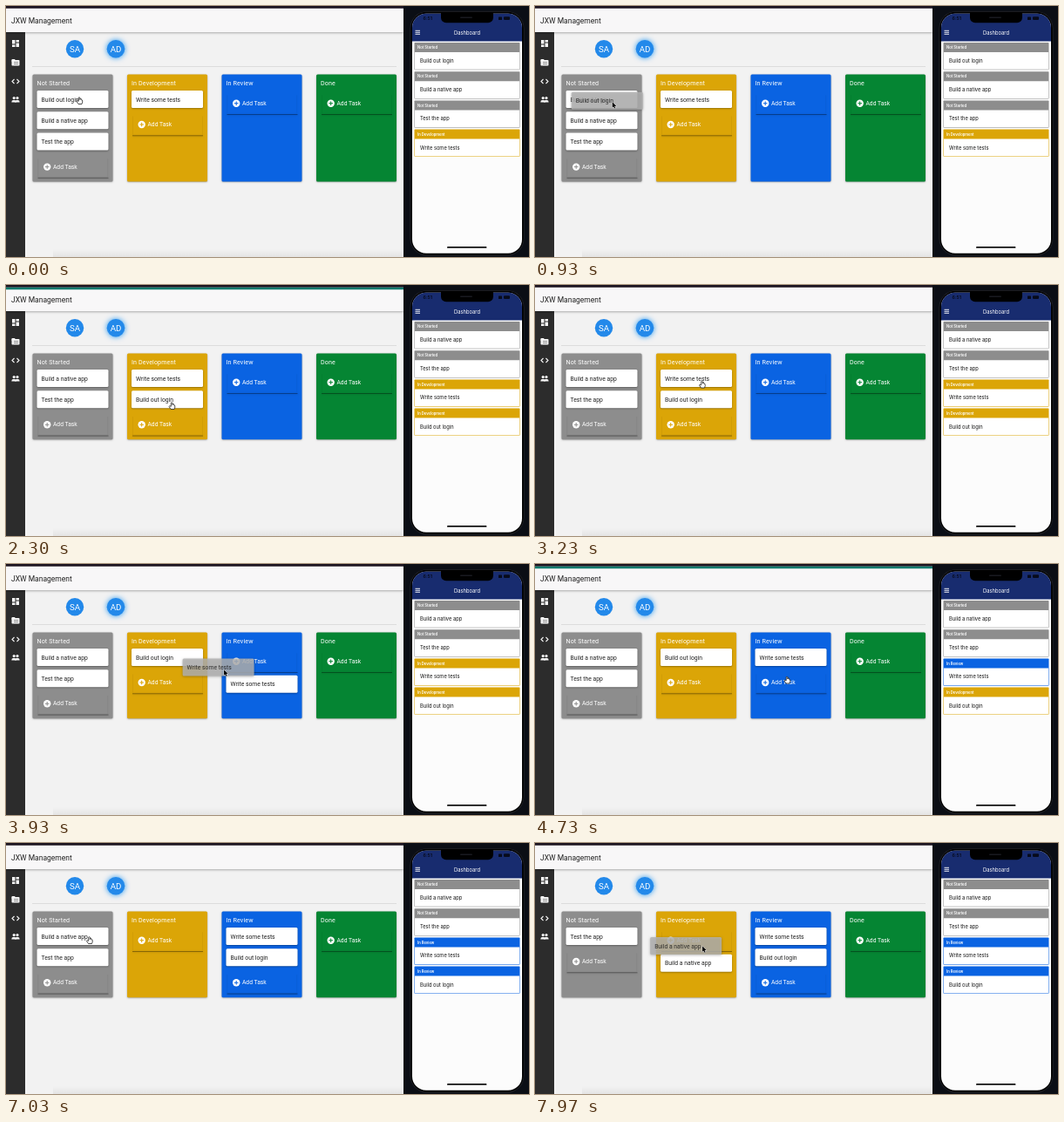
Animation, 600 px wide and 288 px high, one loop 8000 ms. Source, as an HTML page with a canvas:

```html
<!DOCTYPE html>
<html lang="en">
<head>
<meta charset="utf-8">
<title>Task board</title>
<style>
  html, body { margin: 0; width: 100%; height: 100%; overflow: hidden; background: #0b0e15; }
  canvas { display: block; width: 600px; height: 288px; }
</style>
</head>
<body>
<canvas id="stage"></canvas>
<script>
const LOOP = 8000, SETTLE = 200, LOADING = 700;
const canvas = document.getElementById('stage');
const scale = window.devicePixelRatio || 1;
canvas.width = 600 * scale;
canvas.height = 288 * scale;
const ctx = canvas.getContext('2d');
ctx.scale(scale, scale);

const COLUMNS = [
  { title: 'Not Started', x: 30.5, color: '#8d8d8d' },
  { title: 'In Development', x: 139, color: '#dba507' },
  { title: 'In Review', x: 247.5, color: '#0a63e2' },
  { title: 'Done', x: 356, color: '#058533' }
];
const COLUMN_W = 92, CARD_W = 82, CARD_H = 20, FIRST_Y = 97, PITCH = 24.3;

const LOGIN = 'Build out login', NATIVE = 'Build a native app';
const TEST = 'Test the app', WRITE = 'Write some tests';
const START = [[LOGIN, NATIVE, TEST], [WRITE], [], []];
const DRAGS = [
  { task: LOGIN, from: 0, to: 1, grab: 870, drop: 1950 },
  { task: WRITE, from: 1, to: 2, grab: 3450, drop: 4400 },
  { task: LOGIN, from: 1, to: 2, grab: 5700, drop: 6300 },
  { task: NATIVE, from: 0, to: 1, grab: 7400, drop: 9000 }
];

// Pointer tip: time, x, y
const PATH = [
  [0, 84, 104.5], [500, 84, 104.5], [830, 82.5, 108.5], [870, 82.5, 108.5],
  [1600, 158, 130], [1950, 190, 136], [2200, 190, 136], [2900, 191.5, 110],
  [3450, 191.5, 110], [4250, 289, 129], [5000, 289, 129], [5550, 216, 106],
  [5700, 216, 106], [5800, 218, 106], [6250, 312, 120], [6400, 312, 120],
  [6950, 95.5, 107.5], [7400, 95.5, 107.5], [7970, 192, 118.5], [8000, 196, 119]
];

const isDragging = (drag, t) => t >= drag.grab && t < drag.drop;

function pointerAt(t) {
  const i = Math.max(1, PATH.findIndex(key => key[0] >= t));
  const [t0, x0, y0] = PATH[i - 1], [t1, x1, y1] = PATH[i];
  let p = (t - t0) / (t1 - t0);
  if (!DRAGS.some(d => isDragging(d, t))) p = p * p * (3 - 2 * p);
  return { x: x0 + (x1 - x0) * p, y: y0 + (y1 - y0) * p };
}

function boardAt(t, pointer) {
  const lists = START.map(list => [...list]);
  const status = {};
  START.forEach((list, i) => list.forEach(task => status[task] = i));
  let pending = null;
  for (const { task, from, to, grab, drop } of DRAGS) {
    const settled = t >= drop + SETTLE;
    const hovering = t >= grab && (t >= drop || pointer.x >= COLUMNS[to].x);
    if (settled || hovering) lists[from] = lists[from].filter(name => name !== task);
    if (settled) {
      lists[to].push(task);
      status[task] = to;
    } else if (hovering) pending = { task, to };
  }
  return { lists, status, pending };
}

function box(x, y, w, h, fill, radius = 0) {
  ctx.fillStyle = fill;
  ctx.beginPath();
  ctx.roundRect(x, y, w, h, radius);
  ctx.fill();
}

function disc(x, y, r, fill) {
  ctx.fillStyle = fill;
  ctx.beginPath();
  ctx.arc(x, y, r, 0, 7);
  ctx.fill();
}

function text(str, x, y, size, color, { font = 'Roboto', weight = 400, align = 'left', spacing = 0 } = {}) {
  ctx.font = `${weight} ${size}px ${font}, sans-serif`;
  ctx.letterSpacing = spacing + 'px';
  ctx.textAlign = align;
  ctx.fillStyle = color;
  ctx.fillText(str, x, y);
}

function stroke(d, color, width, x = 0, y = 0) {
  ctx.save();
  ctx.translate(x, y);
  ctx.strokeStyle = color;
  ctx.lineWidth = width;
  ctx.stroke(new Path2D(d));
  ctx.restore();
}

function withShadow(color, blur, dy, draw) {
  ctx.save();
  ctx.shadowColor = color;
  ctx.shadowBlur = blur * scale;
  ctx.shadowOffsetY = dy * scale;
  draw();
  ctx.restore();
}

function drawIcons() {
  const white = '#f4f4f4';
  box(7, 39, 3.5, 4.5, white); box(7, 44.5, 3.5, 2.5, white);
  box(11.5, 39, 3.5, 2.5, white); box(11.5, 42.5, 3.5, 4.5, white);
  box(6.5, 61, 4, 3, white, 0.7); box(6.5, 62, 9, 6.5, white, 0.7);
  box(9, 64, 5, 0.8, '#777'); box(9, 66, 5, 0.8, '#777');
  stroke('M-1.5-2.5L-4 0L-1.5 2.5M1.5-2.5L4 0L1.5 2.5', white, 1.1, 11, 86.5);
  for (const x of [9.2, 13]) {
    disc(x, 105.6, 1.6, white);
    box(x - 2.8, 108, 5.4, 2.6, white, [2, 2, 0, 0]);
  }
}

function drawFrame(loading) {
  box(0, 0, 600, 288, '#0b0e15');
  box(0, 0, 456, 3, '#1c1420');
  box(22, 30, 434, 258, '#f2f2f2');
  box(0, 30, 22, 258, '#2c2c2c');
  withShadow('rgba(0,0,0,.4)', 3, 1, () => box(0, 2.7, 456, 27.3, '#f8f7f8'));
  if (loading) box(0, 2.7, 456, 2.5, '#087a6d');
  text('JXW Management', 6, 19.5, 8.5, '#222');
  drawIcons();

  disc(79, 49.3, 10.2, '#2389ea');
  withShadow('#2196f3', 6, 0, () => disc(126, 49.3, 10.3, '#2389ea'));
  text('SA', 79, 52.8, 9.7, '#fff', { align: 'center' });
  text('AD', 126, 52.8, 9.7, '#fff', { align: 'center' });
  box(30, 69.3, 418, 0.8, '#d5d5d5');

  const fade = ctx.createLinearGradient(0, 279, 0, 288);
  fade.addColorStop(0, 'rgba(0,0,0,0)');
  fade.addColorStop(1, 'rgba(0,0,0,.06)');
  box(54, 279, 402, 9, fade);
}

function drawCard(task, x, y) {
  withShadow('rgba(0,0,0,.38)', 2, 0.8, () => box(x, y, CARD_W, CARD_H, '#fff', 1.5));
  text(task, x + 5, y + 12.5, 6.8, '#222');
}

function drawAddButton(x, y, color) {
  withShadow('rgba(0,0,0,.45)', 2, 0.6, () => box(x + 6, y + 12.6, 81, 1, 'rgba(0,0,0,.35)'));
  box(x + 6, y - 9, 0.6, 21, 'rgba(0,0,0,.08)');
  box(x + 86, y - 9, 0.6, 21, 'rgba(0,0,0,.08)');
  disc(x + 16.7, y + 0.4, 4.2, '#fff');
  stroke('M-2.3 0H2.3M0-2.3V2.3', color, 1, x + 16.7, y + 0.4);
  text('Add Task', x + 23.5, y + 2.5, 6.7, '#fff');
}

function drawBoard({ lists, pending }) {
  const sizes = lists.map((list, i) => list.length + (pending && pending.to === i ? 1 : 0));
  const height = 50 + PITCH * Math.max(...sizes);
  COLUMNS.forEach(({ title, x, color }, i) => {
    withShadow('rgba(0,0,0,.38)', 2, 0.6, () => box(x, 78.6, COLUMN_W, height, color, 1.5));
    text(title, x + 5, 90.7, 7.1, '#fff', { spacing: 0.13 });
    lists[i].forEach((task, n) => drawCard(task, x + 5, FIRST_Y + n * PITCH));
    const offset = lists[i].length * PITCH;
    drawAddButton(x, 111.3 + offset, color);
    if (pending && pending.to === i) drawCard(pending.task, x + 5, 127.8 + offset);
  });
}

function drawPhone(status, reordered) {
  const font = 'Inter';
  box(463.5, 6, 131, 280.5, '#25262b', 20);
  box(464.2, 6.7, 129.6, 279.1, '#000', 19);
  ctx.save();
  ctx.beginPath();
  ctx.roundRect(466, 8.7, 126, 275, 16);
  ctx.clip();
  box(466, 8, 126, 276, '#fcfcfc');
  box(466, 8, 126, 32.5, '#182c6f');
  text('6:51', 478.5, 16.3, 5.3, '#070b1c', { font, weight: 600 });
  box(565, 12.5, 4, 3.5, '#070b1c', 0.5);
  box(571, 12.3, 7, 3.8, '#070b1c', 1);
  stroke('M469.5 28.3H475M469.5 30.3H475M469.5 32.3H475', '#fff', 0.9);
  text('Dashboard', 529, 32.8, 5.8, '#fff', { font, align: 'center' });

  const order = reordered ? [NATIVE, TEST, WRITE, LOGIN] : [LOGIN, NATIVE, TEST, WRITE];
  order.forEach((task, i) => {
    const y = 42 + i * 33.2, { title, color } = COLUMNS[status[task]];
    box(468.5, y, 121, 31.3, color, 0.8);
    box(469, y + 11, 120, 19.8, '#fff');
    text(title, 472, y + 7.1, 4.2, '#fff', { font, weight: 600 });
    text(task, 475, y + 23, 5.75, '#111', { font });
  });
  box(506, 276, 45.5, 1.8, '#111', 1);
  ctx.restore();
  box(499, 8, 60, 11.3, '#000', [0, 0, 6, 6]);
  box(521, 12.5, 14, 1.5, '#191a20', 1);
}

function drawGhost(drag, pointer) {
  const grabPoint = pointerAt(drag.grab);
  const x = pointer.x - grabPoint.x + COLUMNS[drag.from].x + 5;
  const y = pointer.y - grabPoint.y + FIRST_Y;
  withShadow('rgba(0,0,0,.35)', 3, 0.8, () =>
    box(x, y, CARD_W, CARD_H, 'rgba(180,180,180,.82)', 1.5));
  text(drag.task, x + 5, y + 12.5, 6.8, 'rgba(25,25,25,.85)');
}

function drawPointer({ x, y }, hand) {
  const shape = new Path2D(hand
    ? 'M-.8.7Q0-.5.8.7V3Q2-.1 2.4 3.2Q3.8 2.5 3.8 5.5L3 8H-1L-3 5Q-3 3.4-.8 4.8Z'
    : 'M0 0V6.3L1.4 5L2.4 7.3L3.4 6.8L2.4 4.6H4.4Z');
  ctx.save();
  ctx.translate(x, y);
  ctx.lineWidth = 0.8;
  ctx.lineJoin = 'round';
  ctx.strokeStyle = hand ? '#222' : '#fff';
  ctx.fillStyle = hand ? '#fff' : '#000';
  ctx.fill(shape);
  ctx.stroke(shape);
  if (!hand) ctx.fill(shape);
  ctx.restore();
}

function render(now) {
  const t = now % LOOP;
  const pointer = pointerAt(t);
  const board = boardAt(t, pointer);
  const drag = DRAGS.find(d => isDragging(d, t));
  const overColumn = COLUMNS.some(c => pointer.x > c.x && pointer.x < c.x + COLUMN_W);

  drawFrame(DRAGS.some(d => t >= d.drop && t < d.drop + LOADING));
  drawBoard(board);
  drawPhone(board.status, t >= DRAGS[0].drop + SETTLE);
  if (drag) drawGhost(drag, pointer);
  drawPointer(pointer, !drag && overColumn);
}

const began = performance.now();
(function tick() {
  render(performance.now() - began);
  requestAnimationFrame(tick);
})();
</script>
</body>
</html>
```
